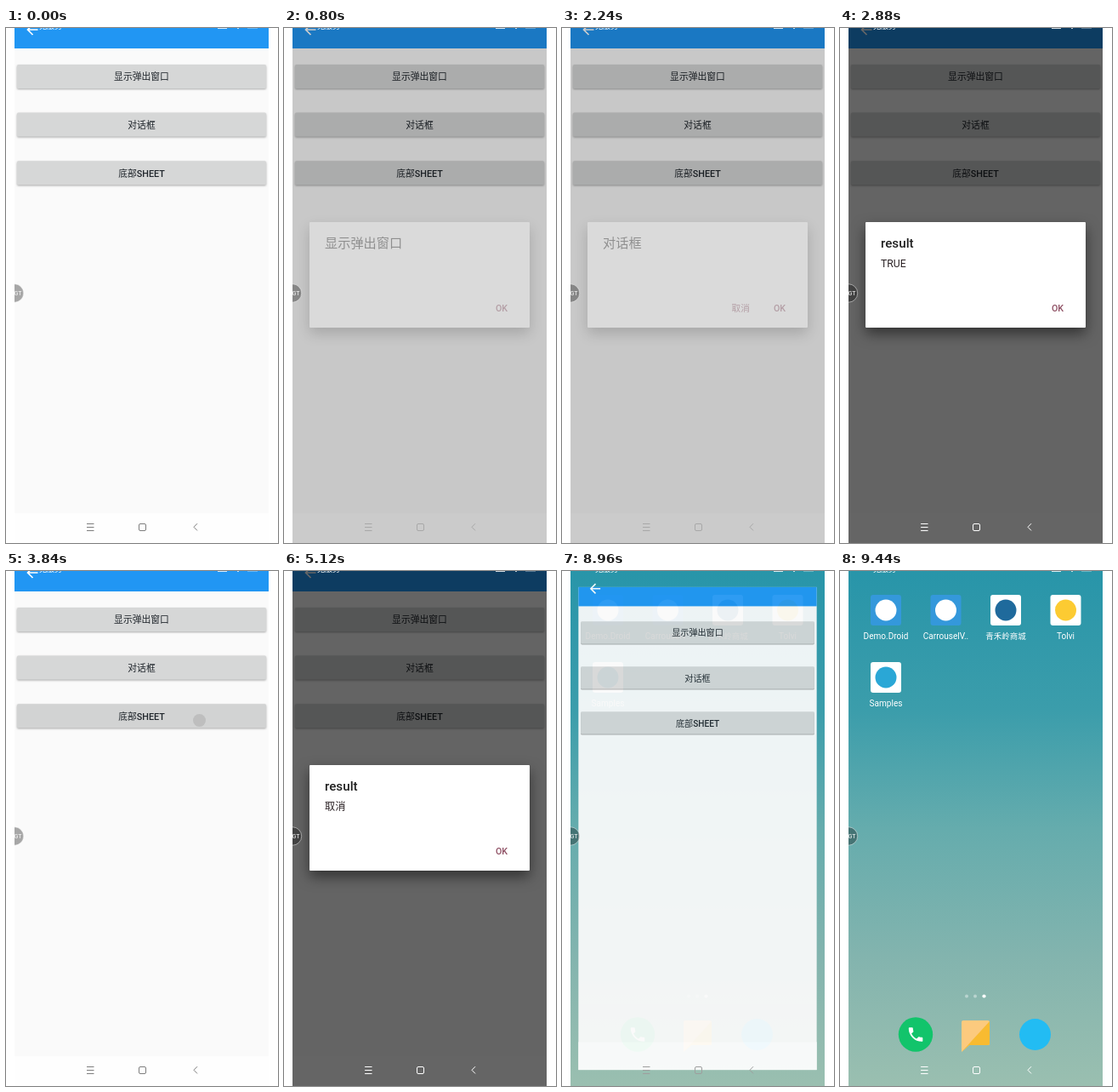
Animation of 320x605 px, one loop 9.6 s. Source, as an HTML page:

```html
<!DOCTYPE html>
<html lang="zh-CN">
<head>
<meta charset="utf-8">
<style>
html, body { margin: 0; width: 100%; height: 100%; overflow: hidden; background: #fff }
svg { display: block; width: 320px; height: 605px; font-family: Roboto, "Noto Sans CJK SC", "Noto Sans CJK", sans-serif }
.btn text { font-size: 10.8px; font-weight: 500; fill: #1f252b; text-anchor: middle }
.btn rect { filter: drop-shadow(0 1px .8px rgba(0,0,0,.32)) }
.card rect { fill: #fff; filter: drop-shadow(0 7px 8px rgba(0,0,0,.5)) }
.title { font-size: 15.2px; font-weight: 500; fill: #212121 }
.msg { font-size: 12.2px; fill: #2b2225 }
.act { font-size: 10.7px; font-weight: 500; fill: #8e4f63; text-anchor: end }
.label { font-size: 10.05px; fill: #fff; text-anchor: middle }
.line { fill: none }
</style>
</head>
<body>
<svg viewBox="0 0 320 605">
  <defs>
    <clipPath id="screen"><rect x="10" width="299" height="605"/></clipPath>
    <linearGradient id="sky" x2="0" y2="1">
      <stop stop-color="#2895a9"/>
      <stop offset=".27" stop-color="#3b9dab"/>
      <stop offset=".5" stop-color="#65acad"/>
      <stop offset=".75" stop-color="#83b4ae"/>
      <stop offset="1" stop-color="#9abfb0"/>
    </linearGradient>
  </defs>
  <g clip-path="url(#screen)">
    <g id="home">
      <rect x="10" width="299" height="605" fill="url(#sky)"/>
      <g id="apps"></g>
      <g fill="#fff">
        <circle cx="149" cy="499.5" r="2" opacity=".4"/>
        <circle cx="159" cy="499.5" r="2" opacity=".4"/>
        <circle cx="169.5" cy="499.5" r="2.1"/>
      </g>
      <circle cx="89" cy="544.5" r="20.2" fill="#12c46b"/>
      <path transform="translate(78 533.5) scale(.92)" fill="#fff" d="M6.6 10.8c1.4 2.8 3.8 5.1 6.6 6.6l2.2-2.2c.3-.3.7-.4 1-.2 1.1.4 2.3.6 3.6.6.6 0 1 .4 1 1V20c0 .6-.4 1-1 1C10.600 21 3 13.400 3 4c0-.6.400-1 1-1h3.500c.6 0 1 .4 1 1 0 1.300.2 2.500.6 3.600.1.300 0 .7-.2 1z"/>
      <path d="M145 528H174Q176 528 176 530V555Q176 557 174 557H152L143 565V530Q143 528 145 528Z" fill="#fcca7e"/>
      <path d="M176 529V555Q176 557 174 557H152L143 565Z" fill="#f8bb31"/>
      <circle cx="229.5" cy="544.5" r="18.5" fill="#22bcf3"/>
    </g>
    <g id="page">
      <rect x="10" width="299" height="605" fill="#fafafa"/>
      <rect x="10" y="570" width="299" height="35" fill="#fefefe"/>
      <rect x="10" width="299" height="24" fill="#2196f3"/>
      <path class="line" d="M37.500 2H26M31.500-4 25.500 2 31.500 8" stroke="#fff" stroke-width="1.700"/>
      <g id="buttons"></g>
    </g>
    <rect id="scrim" x="10" width="299" height="605"/>
    <g id="cards"></g>
    <g fill="#fff">
      <text x="39" y="1" font-size="9">无服务</text>
      <rect x="249" width="11" height="1" opacity=".8"/>
      <rect x="272" width="2" height="1" opacity=".7"/>
      <rect x="284" width="12" height="1" opacity=".3"/>
    </g>
    <g id="nav" class="line">
      <path d="M95 582.500h8.500M95 586.500h8.500M95 590.500h8.500"/>
      <rect x="156.500" y="582.500" width="8" height="8" rx="1.500"/>
      <path d="M225 582.200 221 586.300 225 590.400"/>
    </g>
    <circle cx="10" cy="311.500" r="10.700" fill="#000" fill-opacity=".33" stroke="#fff" stroke-opacity=".6" stroke-width=".8"/>
    <text x="9.500" y="314.200" font-size="7" fill="#fff">GT</text>
    <circle id="dot" r="7.500" fill="#787878" fill-opacity=".22"/>
  </g>
</svg>
<script>
const LOOP = 9600, STEP = 160;
const $ = id => document.getElementById(id);
const clamp = v => Math.max(0, Math.min(1, v));

const apps = [
  ['Demo.Droid', 54, 46, '#3498db', '#fff'],
  ['CarrouselV..', 124.5, 46, '#3498db', '#fff'],
  ['青禾岭商城', 195, 46, '#fff', '#1f6a9c', 9.5],
  ['Tolvi', 265.5, 46, '#fff', '#fccb32'],
  ['Samples', 54, 125, '#fff', '#2aa7d6']
];
$('apps').innerHTML = apps.map(([name, x, y, tile, mark, size = 10.05]) =>
  `<rect x="${x - 18}" y="${y - 18}" width="36" height="36" rx="3" fill="${tile}"/>
   <circle cx="${x}" cy="${y}" r="12.5" fill="${mark}"/>
   <text class="label" x="${x}" y="${y + 34}" style="font-size:${size}px">${name}</text>`).join('');

const labels = ['显示弹出窗口', '对话框', '底部SHEET'];
const top_ = i => 43 + i * 56.6;
$('buttons').innerHTML = labels.map((s, i) =>
  `<g class="btn"><rect x="13" y="${top_(i)}" width="293" height="28" rx="1.5"/>
   <text x="159.5" y="${top_(i) + 18.4}">${s}</text></g>`).join('');
const faces = document.querySelectorAll('.btn rect');

// start, fade-in time, end, title, message, actions from the right
const dialogs = [
  [640, 480, 1600, labels[0], '', ['OK']],
  [2080, 480, 2880, labels[1], '', ['OK', '取消']],
  [2560, 320, 3360, 'result', 'TRUE', ['OK']],
  [4000, 480, 5120, labels[2], '', ['取消']],
  [4800, 320, 5920, 'result', '取消', ['OK']]
];
$('cards').innerHTML = dialogs.map(([, , , title, msg, acts]) =>
  `<g class="card"><rect x="30" y="228" width="259" height="124" rx="1"/>
   <text class="title" x="48" y="258.3">${title}</text>
   <text class="msg" x="48" y="281.2">${msg}</text>
   ${acts.map((s, i) => `<text class="act" x="${263 - i * 42}" y="333">${s}</text>`).join('')}</g>`).join('');
const cards = document.querySelectorAll('.card');

// time, x, y of each tap
const taps = [
  [480, 222, 60], [1440, 256, 330], [1920, 225, 117], [2560, 256, 330],
  [3040, 256, 330], [3840, 227.5, 175.5], [4960, 254, 330], [5760, 256, 330]
];

function draw(now) {
  const t = Math.floor(now % LOOP / STEP) * STEP;

  let dim = 0;
  dialogs.forEach(([start, fade, end], i) => {
    const a = Math.min(clamp((t - start) / fade), clamp((end - t) / 320));
    cards[i].setAttribute('opacity', a);
    dim = Math.min(1, dim + a);
  });
  $('scrim').setAttribute('opacity', dim * .6);

  const tap = taps.find(p => p[0] === t);
  $('dot').setAttribute('opacity', tap ? 1 : 0);
  if (tap) $('dot').setAttribute('transform', `translate(${tap[1]} ${tap[2]})`);
  faces.forEach((f, i) => {
    const pressed = tap && tap[2] > top_(i) && tap[2] < top_(i) + 28;
    f.setAttribute('fill', pressed ? '#d2d3d3' : '#d6d7d7');
  });

  const leave = clamp((t - 8800) / 640), scale = 1 - leave * .25;
  $('page').setAttribute('opacity', 1 - leave * leave);
  $('page').setAttribute('transform',
    `translate(${159.5 * (1 - scale)} ${302.5 * (1 - scale)}) scale(${scale})`);

  const c = Math.round(125 + 130 * Math.max(dim, leave));
  $('nav').setAttribute('stroke', `rgb(${c},${c},${c})`);
  requestAnimationFrame(draw);
}
requestAnimationFrame(draw);
</script>
</body>
</html>
```
